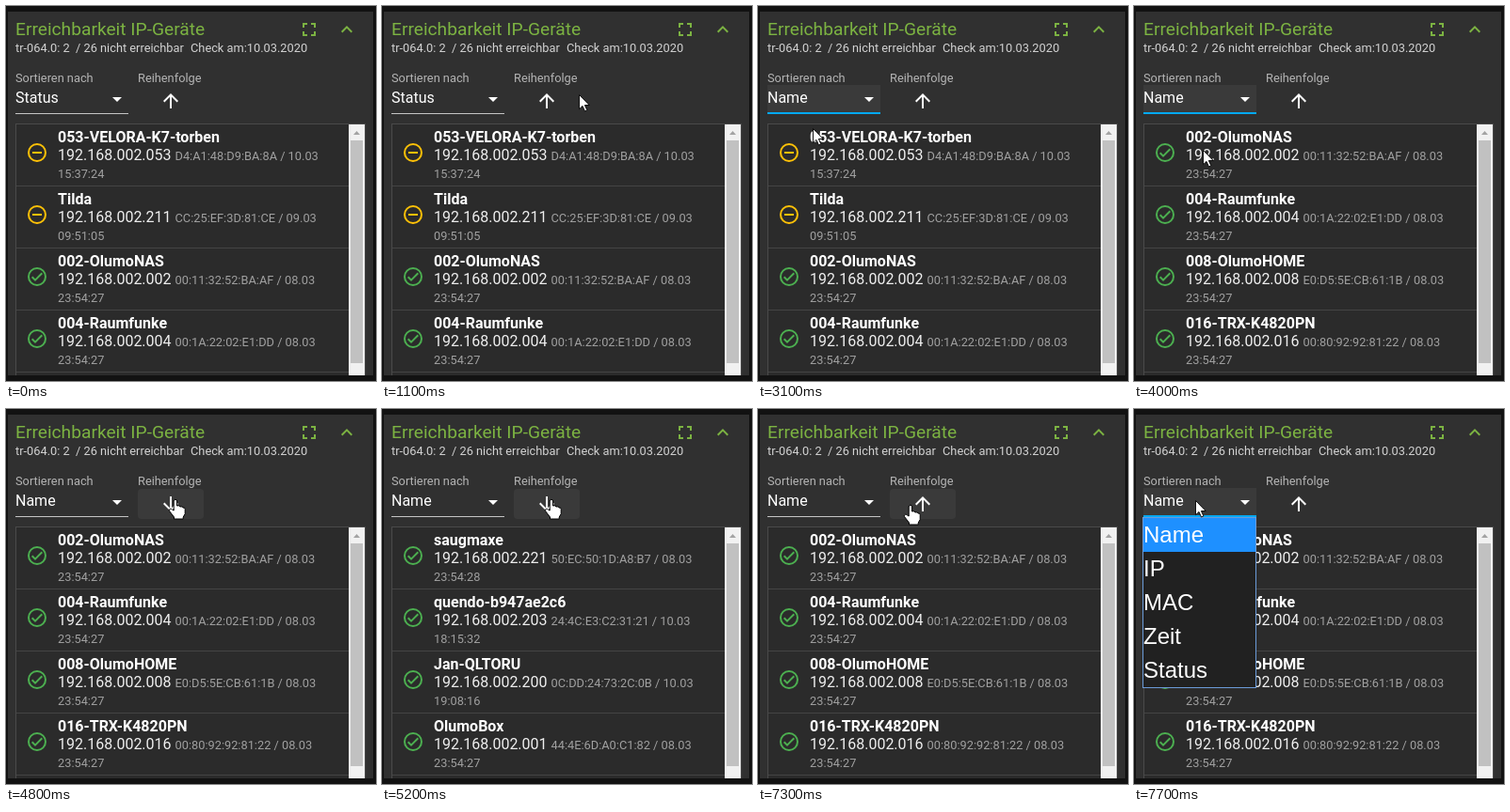
Animation, 393 px wide and 399 px high, one loop 8000 ms. Source, as an HTML page:

```html
<!DOCTYPE html>
<html lang="de">
<head>
<meta charset="utf-8">
<title>Erreichbarkeit IP-Geräte</title>
<style>
  html, body { margin: 0; width: 100%; height: 100%; overflow: hidden; background: #121212; }
  svg { display: block; width: 100vw; height: 100vh; }
  text { font: 16px Roboto, sans-serif; fill: #fff; white-space: pre; }
  .title { font-size: 19.2px; fill: #7cb342; }
  .small { font-size: 12.8px; fill: #d2d2d2; }
  .label { font-size: 12.8px; fill: #b4b4b4; }
  .name { font-weight: 700; }
  .ip { fill: #eee; }
  .meta { font-size: 12.8px; fill: #a0a0a0; }
  .option { font: 24px "Liberation Sans", Arial, sans-serif; }
  .line { fill: none; stroke-width: 2; }
  .green { stroke: #7cb342; }
</style>
</head>
<body>
<svg id="stage" viewBox="0 0 393 399">
  <rect width="393" height="399" fill="#121212"/>
  <rect x="2" y="6" width="388" height="387" fill="#303030"/>

  <text class="title" x="10" y="31">Erreichbarkeit IP-Geräte</text>
  <text class="small" x="10" y="49">tr-064.0: 2</text>
  <text class="small" x="74" y="49">/ 26 nicht erreichbar</text>
  <text class="small" x="196" y="49">Check am:10.03.2020</text>
  <path class="line green" transform="translate(310 13)" d="M6 10V6h4M14 6h4v4M18 14v4h-4M10 18H6v-4"/>
  <path class="line green" transform="translate(350 13)" d="M6.7 14.7 12 9.4l5.3 5.3"/>

  <text class="label" x="10" y="81">Sortieren nach</text>
  <rect id="field" x="10" y="84" width="120" height="30" fill="#3a3a3a"/>
  <text id="choice" x="10" y="103"></text>
  <path d="M113 97h10l-5 5z" fill="#fff"/>
  <rect id="idleLine" x="10" y="114" width="120" height="1" fill="#c4c4c4"/>
  <rect id="focusLine" x="10" y="113" width="120" height="2" fill="#03a9f4"/>

  <text class="label" x="140" y="81">Reihenfolge</text>
  <rect id="button" x="140" y="85" width="70" height="32" rx="4" fill="#3a3a3a"/>
  <path id="arrow" fill="#fff" d="M-8 0l1.41 1.41L-1 -4.17V8h2V-4.17l5.58 5.59L8 0 0-8z"/>

  <clipPath id="clip"><rect x="10" y="125" width="372" height="268"/></clipPath>
  <g clip-path="url(#clip)">
    <rect x="10.5" y="125.5" width="371" height="280" fill="#2b2b2b" stroke="#4a4a4a"/>
    <g id="lists"></g>
    <rect x="364" y="126" width="17" height="267" fill="#f1f1f1"/>
    <rect x="366" y="143" width="13" height="237" fill="#c1c1c1"/>
    <path d="M369 137l3.5-4 3.5 4z" fill="#a3a3a3"/>
  </g>

  <g id="popup">
    <rect x="9.5" y="115.5" width="120" height="181" fill="#212121" stroke="#6b9bd8"/>
    <rect id="mark" x="10" width="119" height="36" fill="#1e90ff"/>
  </g>

  <path id="pointer" d="M.5.5v15.2l3.5-3.3 2.5 5.6 2.4-1.1-2.5-5.4h4.8z" fill="#fff" stroke="#000" stroke-width=".9"/>
  <path id="hand" d="M-1.8 12V2q0-1.7 1.7-1.7T1.6 2v5q3 -1 3.3 1q3-.8 3.1 1q2.2-.3 2.2 1.6v5l-2 3.4v2H-1.5v-2l-5-6.5q-.8-1.7.8-2.2t2.4 1z"
    fill="#fff" stroke="#000" stroke-width="1"/>
</svg>

<script>
const LOOP = 8000, STEP = 100;
const $ = id => document.getElementById(id);

function add(parent, tag, attrs, text) {
  const node = document.createElementNS("http://www.w3.org/2000/svg", tag);
  for (const key in attrs) node.setAttribute(key, attrs[key]);
  if (text) node.textContent = text;
  parent.append(node);
  return node;
}

// name, last IP block, MAC, day, time, offline
const phone = ["053-VELORA-K7-torben", "053", "D4:A1:48:D9:BA:8A", "10.03", "15:37:24", true];
const tablet = ["Tilda", "211", "CC:25:EF:3D:81:CE", "09.03", "09:51:05", true];
const nas = ["002-OlumoNAS", "002", "00:11:32:52:BA:AF", "08.03", "23:54:27"];
const hub = ["004-Raumfunke", "004", "00:1A:22:02:E1:DD", "08.03", "23:54:27"];
const home = ["008-OlumoHOME", "008", "E0:D5:5E:CB:61:1B", "08.03", "23:54:27"];
const printer = ["016-TRX-K4820PN", "016", "00:80:92:92:81:22", "08.03", "23:54:27"];
const vacuum = ["saugmaxe", "221", "50:EC:50:1D:A8:B7", "08.03", "23:54:28"];
const speaker = ["quendo-b947ae2c6", "203", "24:4C:E3:C2:31:21", "10.03", "18:15:32"];
const laptop = ["Jan-QLTORU", "200", "0C:DD:24:73:2C:0B", "10.03", "19:08:16"];
const router = ["OlumoBox", "001", "44:4E:6D:A0:C1:82", "08.03", "23:54:27"];

function makeList(devices) {
  const list = add($("lists"), "g", {});
  devices.forEach(([name, block, mac, day, time, offline], i) => {
    const row = add(list, "g", { transform: `translate(0 ${126 + 66 * i})` });
    const icon = add(row, "g", { class: "line", transform: "translate(33 30)", stroke: offline ? "#ffc107" : "#4caf50" });
    add(icon, "circle", { r: 9 });
    add(icon, "path", { d: offline ? "M-5 0H5" : "M-5.3.3-2 3.6 5.3-3.7" });
    add(row, "text", { class: "name", x: 55, y: 19 }, name);
    const address = add(row, "text", { class: "ip", x: 55, y: 38 }, `192.168.002.${block} `);
    add(address, "tspan", { class: "meta" }, `${mac} / ${day}`);
    add(row, "text", { class: "meta", x: 55, y: 56.6 }, time);
    add(row, "rect", { x: 11, y: 65, width: 353, height: 1, fill: "#444" });
  });
  return list;
}

const byStatus = makeList([phone, tablet, nas, hub]);
const ascending = makeList([nas, hub, home, printer]);
const descending = makeList([vacuum, speaker, laptop, router]);

["Name", "IP", "MAC", "Zeit", "Status"].forEach((label, i) =>
  add($("popup"), "text", { class: "option", x: 10, y: 142 + 36 * i }, label));

// time, x, y of the pointer tip
const path = [
  [500, 349, 24], [800, 272, 58], [1100, 209, 94], [1200, 172, 107], [1300, 137, 112],
  [1400, 104, 109], [1500, 80, 102], [1600, 70, 99], [2600, 70, 99], [2700, 67, 109],
  [2800, 61, 125], [2900, 58, 130], [3700, 58, 130], [3800, 59, 136], [4000, 73, 153],
  [4200, 108, 149], [4400, 151, 126], [4500, 168, 108], [4600, 180, 96], [7200, 180, 96],
  [7300, 162, 102], [7400, 126, 106], [7500, 88, 103], [7600, 65, 97], [8000, 65, 97]
];

function pointerAt(t) {
  const next = Math.max(1, path.findIndex(p => p[0] > t));
  const [t0, x0, y0] = path[next - 1], [t1, x1, y1] = path[next];
  const k = (t - t0) / (t1 - t0);
  return [x0 + (x1 - x0) * k, y0 + (y1 - y0) * k];
}

const show = (node, on) => { node.style.display = on ? "" : "none"; };

function draw(t) {
  const within = (from, to) => t >= from && t < to;

  show(byStatus, t < 3200);
  show(ascending, within(3200, 4900) || t >= 6800);
  show(descending, within(4900, 6800));

  const focused = within(1600, 4700) || t >= 7700;
  show($("field"), within(1400, 4700) || t >= 7500);
  show($("focusLine"), focused);
  show($("idleLine"), !focused);
  $("choice").textContent = t < 3100 ? "Status" : "Name";

  show($("button"), within(1200, 1400) || within(4700, 7400));
  $("button").setAttribute("fill", within(4900, 5200) || within(6800, 7100) ? "#414141" : "#3a3a3a");
  $("arrow").setAttribute("transform", `translate(175 101) rotate(${within(4800, 6700) ? 180 : 0})`);

  show($("popup"), within(2200, 3100) || t >= 7700);
  $("mark").setAttribute("y", within(2200, 2800) ? 260 : 116);

  const onButton = within(1200, 1300) || within(4600, 7400);
  show($("pointer"), t >= 500 && !onButton);
  show($("hand"), onButton);
  if (t >= 500) {
    const move = `translate(${pointerAt(t).map(Math.round).join(" ")})`;
    $("pointer").setAttribute("transform", move);
    $("hand").setAttribute("transform", move);
  }
}

const start = performance.now();
function tick() {
  const t = (performance.now() - start) % LOOP;
  draw(Math.floor(t / STEP) * STEP);
  requestAnimationFrame(tick);
}
tick();
</script>
</body>
</html>
```
